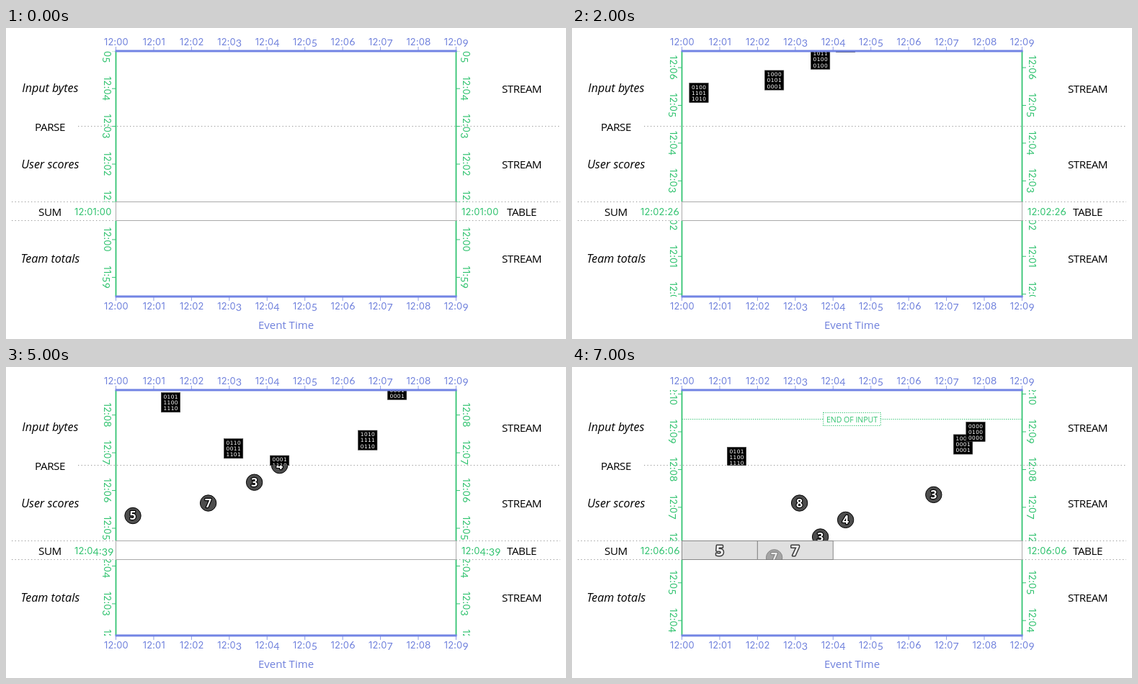
Recreate the animation shown at these times as an HTML page. Size 777x432 px, loop 8 s.

```html
<!DOCTYPE html>
<html lang="en">
<head>
<meta charset="utf-8">
<title>Event time stream</title>
<style>
  html, body { margin: 0; width: 100%; height: 100%; overflow: hidden; background: #fff; }
  svg { display: block; width: 777px; height: 432px; }
  text { font-family: "Open Sans", "Noto Sans", sans-serif; }
  .time { font-family: Lato, sans-serif; font-size: 14.2px; letter-spacing: .2px; }
  .short { font-family: Inter, sans-serif; font-size: 12.9px; }
  .caps { font-size: 15.2px; letter-spacing: -.45px; text-anchor: middle; }
  .name { font-size: 16.1px; font-style: italic; text-anchor: middle; }
  .blue { fill: #6f80dc; }
  .green { fill: #2fc26e; }
  .mid { text-anchor: middle; }
  .bits { font: 7.4px "DejaVu Sans", sans-serif; letter-spacing: .4px; fill: #fff; text-anchor: middle; }
  .score { font-size: 16px; font-weight: 700; fill: #fff; stroke: #000; stroke-width: 2.4px;
    paint-order: stroke; stroke-linejoin: round; text-anchor: middle; }
  .sum { font-size: 20px; font-weight: 700; fill: #f2f2f2; stroke: #3c3c3c; stroke-width: 3px;
    paint-order: stroke; stroke-linejoin: round; text-anchor: middle; }
  .dots { stroke: #999; stroke-width: 1.1; stroke-dasharray: 1.3 3.2; }
</style>
</head>
<body>
<svg viewBox="0 0 777 432">
  <defs>
    <clipPath id="axisClip"><path d="M120 32H660V241.5H120ZM120 267.5H660V373H120Z"/></clipPath>
    <clipPath id="inputClip"><path d="M152 32H625V136.7H152Z"/></clipPath>
    <clipPath id="scoreClip"><path d="M152 136.7H625V241.5H152Z"/></clipPath>
    <clipPath id="fadeClip"><path d="M152 136.7H625V267.5H152Z"/></clipPath>
    <clipPath id="clockClip"><path d="M625 242H686V268H625Z"/></clipPath>
  </defs>
  <g id="back"></g>
  <g id="axis" clip-path="url(#axisClip)"></g>
  <g id="inputs" clip-path="url(#inputClip)"></g>
  <g id="scores" clip-path="url(#scoreClip)"></g>
  <g id="table"></g>
  <g id="faded" clip-path="url(#fadeClip)"></g>
  <g id="front"></g>
</svg>
<script>
const LEFT = 152.5, RIGHT = 624.5, MINUTE = 52.44, NOW_Y = 241.5;
const LOOP = 8000, HOLD = 1000, TICK = 150, TICK_SECONDS = 6.6665, START = 60;
const END_OF_INPUT = 560;

// x, arrival in seconds after 12:00, score, bit rows
const EVENTS = [
  [176, 320, 5, "0100 1101 1010"],
  [280.6, 340, 7, "1000 0101 0001"],
  [344.6, 373, 3, "1011 0100 0100"],
  [379.6, 400, 4, "0001 1110 1000"],
  [315.6, 426.7, 8, "0110 0011 1101"],
  [501.8, 440, 3, "1010 1111 0110"],
  [228.5, 500, 1, "0101 1100 1110"],
  [542.6, 520, 2, "1001 0001 0001"],
  [560, 540, 8, "0000 0100 0000"]
];

const el = id => document.getElementById(id);
const pad = n => String(n).padStart(2, "0");
const line = (x1, y1, x2, y2, attrs) =>
  `<line x1="${x1}" y1="${y1}" x2="${x2}" y2="${y2}" ${attrs}/>`;
const label = (cls, x, y, s) => `<text class="${cls}" x="${x}" y="${y}">${s}</text>`;

// Old-style figures: 0-2 are short, 3 4 5 7 9 hang below the baseline.
function figures(s) {
  let low = 0;
  return [...s].map(c => {
    const drop = "34579".includes(c) ? 2.6 : 0;
    const cls = "012".includes(c) ? ' class="short"' : "";
    const out = `<tspan${cls} dy="${drop - low}">${c}</tspan>`;
    low = drop;
    return out;
  }).join("");
}
const time = (cls, x, y, s, extra = "") =>
  `<text class="time ${cls}" x="${x}" y="${y}" ${extra}>${figures(s)}</text>`;

function clock(seconds, withSeconds) {
  const all = 12 * 3600 + Math.floor(seconds);
  const hm = pad(Math.floor(all / 3600)) + ":" + pad(Math.floor(all / 60) % 60);
  return withSeconds ? hm + ":" + pad(all % 60) : hm;
}

function drawStatic() {
  let back = line(100, 136.5, 769, 136.5, 'class="dots"');
  for (const y of [241.5, 267.5]) back += line(8, y, 769, y, 'class="dots"');
  back += label("name", 61.3, 89, "Input bytes") + label("name", 61.3, 195, "User scores")
    + label("name", 61.3, 326.3, "Team totals")
    + label("caps", 61, 142.5, "PARSE") + label("caps", 61, 260.6, "SUM")
    + label("caps", 715.5, 260.6, "TABLE");
  for (const y of [90, 195, 326.3]) back += label("caps", 715.5, y, "STREAM");
  back += `<text class="blue mid" x="388.5" y="418.3" font-size="15">Event Time</text>`;
  for (let i = 0; i < 10; i++) {
    const x = LEFT + i * MINUTE, tick = 'stroke="#8f9de8" stroke-width="1"';
    back += line(x, 26, x, 32, tick) + line(x, 373, x, 379, tick);
    back += time("blue mid", x + .4, 23.5, clock(i * 60)) + time("blue mid", x + .4, 390.5, clock(i * 60));
  }
  el("back").innerHTML = back;
  el("front").innerHTML = [32, 373].map(y =>
    line(151.6, y, 625.6, y, 'stroke="#7284e4" stroke-width="3"')).join("");
}

function drawAxis(now, yOf) {
  const green = w => `stroke="#35c473" stroke-width="${w}"`;
  let out = line(LEFT, 32, LEFT, 373, green(1.8)) + line(RIGHT, 32, RIGHT, 373, green(1.8));
  for (let m = Math.floor(now / 60) - 4; m < now / 60 + 6; m++) {
    const y = yOf(m * 60), s = clock(m * 60);
    out += line(147, y, LEFT, y, green(1)) + line(RIGHT, y, 630, y, green(1));
    for (const x of [136.3, 633.8])
      out += time("green mid", 0, 0, s, `transform="translate(${x} ${y}) rotate(90)"`);
  }
  return out;
}

function byteBox(x, y, bits) {
  const rows = bits.split(" ").map((r, i) => label("bits", x + .2, y - 5.4 + i * 8.2, r)).join("");
  return `<rect x="${x - 13.2}" y="${y - 13.6}" width="26.4" height="27.2" fill="#000" stroke="#444" stroke-width=".6"/>` + rows;
}

const ball = (x, y, n) =>
  `<circle cx="${x}" cy="${y}" r="11.2" fill="#4d4d4d" stroke="#000"/>` + label("score", x, y + 5.7, n);

function endMark(y) {
  const dots = 'stroke="#35c473" stroke-width="1.1" stroke-dasharray="1.3 1.6"';
  return line(LEFT, y, RIGHT, y, dots)
    + `<rect x="348.7" y="${y - 9}" width="79.5" height="18" fill="#fff" ${dots}/>`
    + `<text class="green mid" x="388.5" y="${y + 4}" font-size="10.5">END OF INPUT</text>`;
}

function draw(now) {
  const yOf = t => NOW_Y - (t - now) * MINUTE / 60;
  let inputs = endMark(yOf(END_OF_INPUT)), scores = "", faded = "";
  const sums = {};
  for (const [x, t, n, bits] of EVENTS) {
    const y = yOf(t);
    inputs += byteBox(x, y, bits);
    if (y < NOW_Y) scores += ball(x, y, n);
    else {
      faded += `<g opacity=".4">${ball(x, y, n)}</g>`;
      const w = Math.floor((x - LEFT) / (2 * MINUTE));
      sums[w] = (sums[w] || 0) + n;
    }
  }
  let table = `<rect x="${LEFT}" y="241.5" width="${RIGHT - LEFT}" height="26" fill="#fff" stroke="#aaa"/>`;
  for (const w in sums) {
    const x = LEFT + w * 2 * MINUTE;
    table += `<rect x="${x}" y="241.5" width="${2 * MINUTE}" height="26" fill="#e0e0e0" stroke="#888"/>`
      + label("sum", x + MINUTE, 262, sums[w]);
  }
  const s = clock(now, true);
  table += time("green", 95, 259.5, s)
    + `<g clip-path="url(#clockClip)">${time("green", 632, 259.5, s)}</g>`;
  el("axis").innerHTML = drawAxis(now, yOf);
  el("inputs").innerHTML = inputs;
  el("scores").innerHTML = scores;
  el("table").innerHTML = table;
  el("faded").innerHTML = faded;
}

// The scroll advances in 150 ms ticks and is shown once a second.
let shown = -1;
const origin = performance.now();
function frame() {
  const t = Math.max(0, performance.now() - origin) % LOOP;
  const step = Math.floor(t / HOLD);
  if (step !== shown) {
    shown = step;
    draw(START + Math.floor(step * HOLD / TICK) * TICK_SECONDS);
  }
  requestAnimationFrame(frame);
}
drawStatic();
frame();
</script>
</body>
</html>
```
